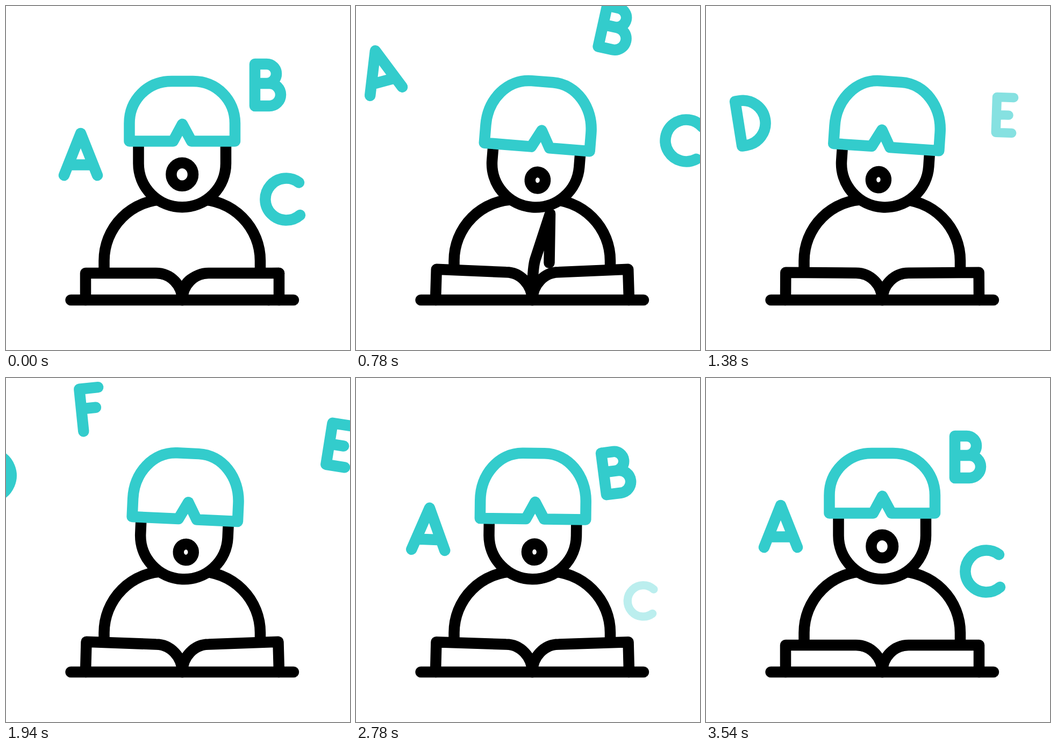
An HTML page for the animation above (3600 ms loop, 640 by 640 pixels).

```html
<!DOCTYPE html>
<html lang="en">
<head>
<meta charset="utf-8">
<title>Reading aloud</title>
<style>
  html, body { margin: 0; width: 100%; height: 100%; overflow: hidden; background: #fff; }
  svg { display: block; width: 100vw; height: 100vh; }
  path, ellipse { stroke: #000; stroke-width: 20.5; stroke-linecap: round; stroke-linejoin: round; fill: #fff; }
  .line { fill: none; }
  .flat { stroke-linecap: butt; }
  .teal, #letters path { stroke: #3cc; }
  #letters path { fill: none; }
</style>
</head>
<body>
<svg viewBox="0 0 640 640">
  <path class="line flat" d="M182.5 492V474A114 114 0 0 1 296.5 360M473 492V474A114 114 0 0 0 359 360"/>
  <g id="head">
    <path class="flat" d="M246.5 256V293A81.25 81.25 0 0 0 409 293V256"/>
    <path id="helmet" class="teal"/>
    <ellipse id="mouth"/>
  </g>
  <path id="page"/>
  <path id="left"/>
  <path id="right"/>
  <path d="M120.5 547H535"/>
  <g id="letters"></g>
</svg>
<script>
const LOOP = 3600;
const RISE = 850;
const $ = id => document.getElementById(id);
const set = (el, attrs) => { for (const k in attrs) el.setAttribute(k, attrs[k]); };
const clamp = x => Math.min(1, Math.max(0, x));
const ease = x => { x = clamp(x); return x * x * (3 - 2 * x); };

// Eased swings between [time, value] stops.
const swing = (t, ...stops) => stops.reduce((v, [time, to], i) => {
  if (!i) return to;
  const from = stops[i - 1][0];
  return v + (to - stops[i - 1][1]) * ease((t - from) / (time - from));
}, 0);

// A letter floats in along `rise` (x, y, angle), rests, then drifts off on a bent path.
const letters = [
  { d: 'M-31 39L0 -39L31 39M-23 19.5H23', at: [139, 276], born: 2350, leave: 0,
    rise: [-14, 20, 8], drift: [-48, -176], bend: [-45, 21], spin: -15 },
  { d: 'M-24 -39V39H3A21 21 0 0 0 3 -3H-24M-24 -39H-2A18 18 0 0 1 -2 -3', at: [487, 147], born: 2400, leave: 0,
    rise: [-7, 93, -24], drift: [-17, -108], bend: [12.5, 3.5], spin: 12.5 },
  { d: 'M23 -31.5A39 39 0 1 0 25 29', at: [522, 360], born: 2690, leave: 0,
    rise: [16, 69, 6], drift: [48, -147], bend: [45, 38], spin: 12.5 },
  { d: 'M0 -42V42H8A42 42 0 0 0 8 -42Z', at: [101.5, 281.5], born: 850, leave: 870,
    drift: [-48, -130], bend: [-33.3, 43.5], spin: -15 },
  { d: 'M37 -39H0V39H35M0 0H27', at: [531.5, 232.8], born: 1220, leave: 1160,
    drift: [32, -147], bend: [38, 36.5], spin: 9 },
  { d: 'M35 -39H0V40M0 -2H27', at: [148, 127.5], born: 1450, leave: 1400,
    drift: [-12, -108], bend: [0, 3.5], spin: -9 }
];
for (const l of letters) {
  l.el = document.createElementNS('http://www.w3.org/2000/svg', 'path');
  l.el.setAttribute('d', l.d);
  $('letters').append(l.el);
}

function drawLetter({ el, at, born, leave, rise, drift, bend, spin }, t) {
  let [x, y] = at, angle = 0;
  const fade = rise && t < born ? 1 : clamp((t - born) / 270);
  if (rise && t >= born) {
    const w = clamp(1 - (t - born) / RISE) ** 2;
    x += rise[0] * w;
    y += rise[1] * w;
    angle = rise[2] * w;
  } else {
    const u = (Math.max(0, t - leave) / 780) ** 1.2;
    x += (drift[0] + bend[0] * u) * u;
    y += (drift[1] + bend[1] * u) * u;
    angle = spin * u;
  }
  set(el, {
    transform: `translate(${x} ${y}) rotate(${angle}) scale(${.62 + .38 * fade})`,
    opacity: fade
  });
}

function drawHead(t) {
  const angle = 4.8 * (t < 950 ? Math.sin(Math.PI / 2 * t / 950) ** 1.3 : clamp((3080 - t) / 2130));
  const n = ease(t / 860) - ease((t - 2720) / 820);
  const dx = swing(t, [0, 0], [600, 9], [1340, -10.4], [2200, 9], [3240, 0]);
  const drop = 11 * n, base = 251.4 + drop, side = 218 + drop, ctrl = 175 + drop / 2, mid = 328 + dx;
  set($('head'), { transform: `rotate(${angle} 328 375)` });
  set($('helmet'), { d: `M229.5 ${base}V${side}C229.5 ${ctrl} 263 140 308 140H348
    C392 140 426 ${ctrl} 426 ${side}V${base}H${mid + 17}L${mid} ${base - 31.5}L${mid - 17} ${base}Z` });
  set($('mouth'), { cx: 327.7 + dx, cy: 313.3 + drop * .95, rx: 20.3 - 6.3 * n, ry: 21.5 - 6.4 * n });
}

function drawBook(t) {
  const b = swing(t, [0, 0], [740, 7.2], [1420, 1.2], [2100, 7], [2500, 7], [3540, 0]);
  const half = s => {
    const x = d => 328 + s * d, y = 497 - b * .25;
    return `M${x(180)} 547L${x(180 - b * .25)} ${497 - b}L${x(49)} ${y}C${x(22)} ${y} 328 519 328 547`;
  };
  set($('left'), { d: half(-1) });
  set($('right'), { d: half(1) });
}

// One sheet swings over the spine, from the right half to the left.
function drawPage(t) {
  const s = t / 480, turn = 47 * s + .27 * s ** 5;
  $('page').style.display = turn < 178 ? '' : 'none';
  if (turn >= 178) return;
  const phi = turn * Math.PI / 180, up = Math.sin(phi) ** .7, f = .28 - .11 * up;
  const cx = 180 * Math.cos(phi), cy = -50 - 111.5 * up;
  const qy = -47 - 12 * up;
  const fx = 160 * Math.cos(phi) + 46 * Math.sin(2 * phi) ** 3, fy = -70 * up;
  set($('page'), {
    transform: 'translate(328 547)',
    d: `M0 -2Q0 ${qy} ${f * cx} ${qy + f * (cy - qy)}L${cx} ${cy}L${fx} ${fy}`
  });
}

let start;
function frame(now) {
  start ??= now;
  const t = (now - start) % LOOP;
  drawHead(t);
  drawBook(t);
  drawPage(t);
  letters.forEach(l => drawLetter(l, t));
  requestAnimationFrame(frame);
}
requestAnimationFrame(frame);
</script>
</body>
</html>
```
